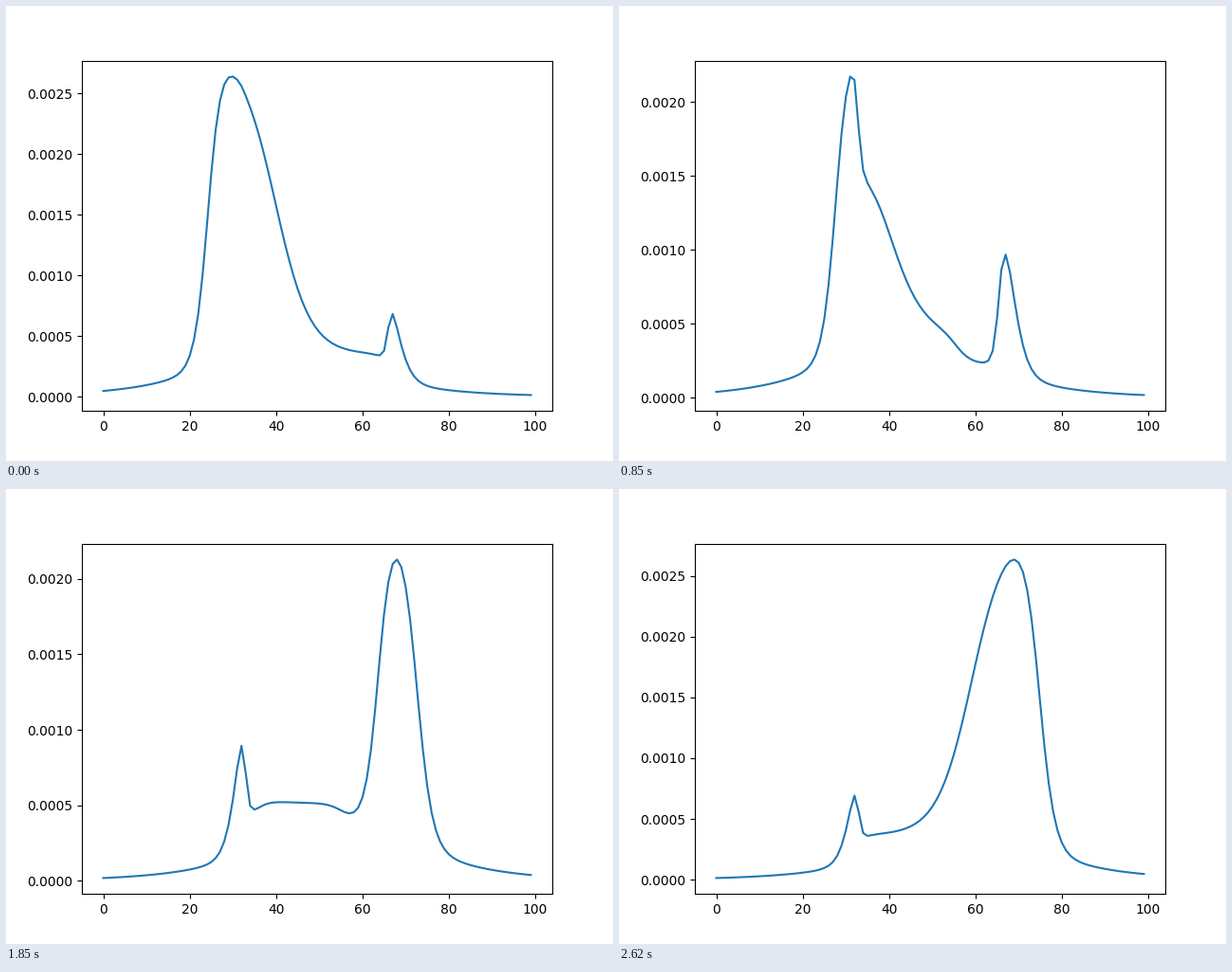
Animation of 640 by 480 pixels, one loop 2700 ms. Source, as a matplotlib script:

```python
import numpy as np
import matplotlib.pyplot as plt
from matplotlib.animation import FuncAnimation

STEPS = 35     # distinct curves in one loop
RATE = 13      # curves per second
LOOP_MS = 2700
TICK_MS = 10
UNIT = 1e-5    # height unit

x = np.arange(100)
mirror = x[::-1]


def sig(z):
    return 1 / (1 + np.exp(-z))


def crest(front, inner):
    """Peak between its outer front and its inner flank, scaled to 1."""
    peak = front * inner
    return peak / peak.max()


def tail(pos, amp, front):
    return 0.018 * amp * np.exp(0.07 * pos) * (1 - front)


def curve(k):
    v = STEPS - 1 - k  # steps left, which drives the right peak

    # Peak heights: the left one sinks while the right one grows.
    amp_l = 76 + 194 * sig((15.4 - k) / 4.5)
    amp_r = 76 + 196 * sig((k - 20.2) / 4.5)

    # Outer fronts move inward as a peak sinks.
    front_l = sig((x - 24 - 7.6 * sig((k - 11) / 3.5)) / 1.5)
    front_r = sig((mirror - 23.8 - 8.1 * sig((v - 13.5) / 5)) / 1.75)

    # Left flank: a broad slope gives way to a sharp edge.
    broad = sig((12.7 - k) / 2.8)
    flank_l = (broad * sig((39.8 - x) / 4)
               + (1 - broad) * sig((32.8 - x) / 0.45))

    # Right flank: one edge that widens as the peak grows.
    edge = 32.7 + 7.1 * np.exp(-v / 10)
    width = 0.4 + 3.6 * np.exp(-v / 8.5)
    flank_r = sig((edge - mirror) / width)

    # Middle plateau, hollowed on both sides halfway through.
    base = 35 + 20 * np.exp(-((k - 20) / 9) ** 2)
    hollow = np.exp(-((k - 17) / 6.5) ** 4)
    dip_l, dip_r = 0.4 * hollow, 0.98 * hollow
    plateau = (base * front_l * front_r
               * (1 - dip_l * sig((36.5 - x) / 1.2))
               * (1 - dip_r * sig((x - 55.6) / 1.7)))

    y = (plateau
         + (amp_l - base * (1 - dip_l)) * crest(front_l, flank_l)
         + (amp_r - base * (1 - dip_r)) * crest(front_r, flank_r)
         + tail(x, amp_l, front_l) + tail(mirror, amp_r, front_r))
    return UNIT * y


plt.rcParams["font.family"] = "DejaVu Sans"
fig, ax = plt.subplots(figsize=(6.4, 4.8), dpi=100)
line, = ax.plot(x, curve(0))


def update(tick):
    ms = tick * TICK_MS + TICK_MS / 2
    line.set_ydata(curve(min(int(ms * RATE / 1000), STEPS - 1)))
    ax.relim()
    ax.autoscale_view()
    return line,


anim = FuncAnimation(fig, update, frames=LOOP_MS // TICK_MS, interval=TICK_MS,
                     repeat=True, repeat_delay=0)
plt.show()
```
